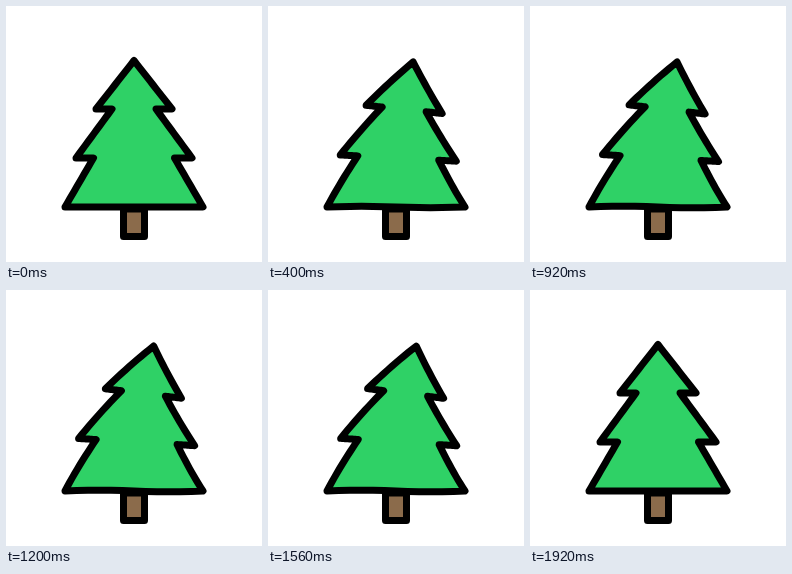
Recreate the animation shown at these times as an HTML page. Size 256x256 px, loop 6000 ms.

```html
<!DOCTYPE html>
<html>
<head>
<meta charset="utf-8">
<style>
  html, body { margin: 0; width: 100%; height: 100%; overflow: hidden; background: #fff; }
  svg { display: block; width: 100%; height: 100%; }
</style>
</head>
<body>
<svg viewBox="0 0 256 256" stroke="#000" stroke-width="7" stroke-linejoin="round">
  <rect x="117.5" y="203" width="21" height="27.5" fill="#8b6b4b"/>
  <path id="tree" fill="#2fd166"/>
</svg>
<script>
const LOOP = 6000, STEP = 40;
const CX = 128, BASE = 201, HEIGHT = 146.5, REACH = 25;
const tree = document.getElementById('tree');

// Right half of the outline, as offsets from the centre line
const half = [[38, 103], [22, 103], [58, 152], [40.5, 152], [69, BASE]];
const outline = [
  [0, BASE - HEIGHT],
  ...half,
  ...half.map(([x, y]) => [-x, y]).reverse()
];

// Sideways shift of the tip: [time, pixels]
const keys = [[0, 0], [640, REACH], [1060, 17], [1420, REACH], [1920, 0]];

function sway(t) {
  for (let i = 1; i < keys.length; i++) {
    const [t0, a] = keys[i - 1], [t1, b] = keys[i];
    if (t < t1) {
      const u = (t - t0) / (t1 - t0);
      return a + (b - a) * u * u * (3 - 2 * u);
    }
  }
  return 0;
}

// Bends a point along a curved spine fixed at the base
function bend(x, y, shift) {
  const h = Math.max(0, (BASE - y) / HEIGHT);
  const tilt = 1.38 * shift * h / HEIGHT;
  const ripple = Math.sin(x / 69 * Math.PI) * Math.max(0, 1 - 4 * h);
  return [
    CX + x + shift * h ** 1.85,
    y + tilt * x + shift / REACH * (2 * h ** 3 + ripple)
  ];
}

function draw(shift) {
  const points = [], parts = 12;
  outline.forEach(([x, y], i) => {
    const [nx, ny] = outline[(i + 1) % outline.length];
    for (let j = 0; j < parts; j++) {
      const u = j / parts;
      const p = bend(x + (nx - x) * u, y + (ny - y) * u, shift);
      points.push(p.map(v => v.toFixed(2)).join());
    }
  });
  tree.setAttribute('d', 'M' + points.join('L') + 'Z');
}

function frame() {
  const t = performance.now() % LOOP;
  draw(sway(Math.floor(t / STEP) * STEP));
  requestAnimationFrame(frame);
}
frame();
</script>
</body>
</html>
```
